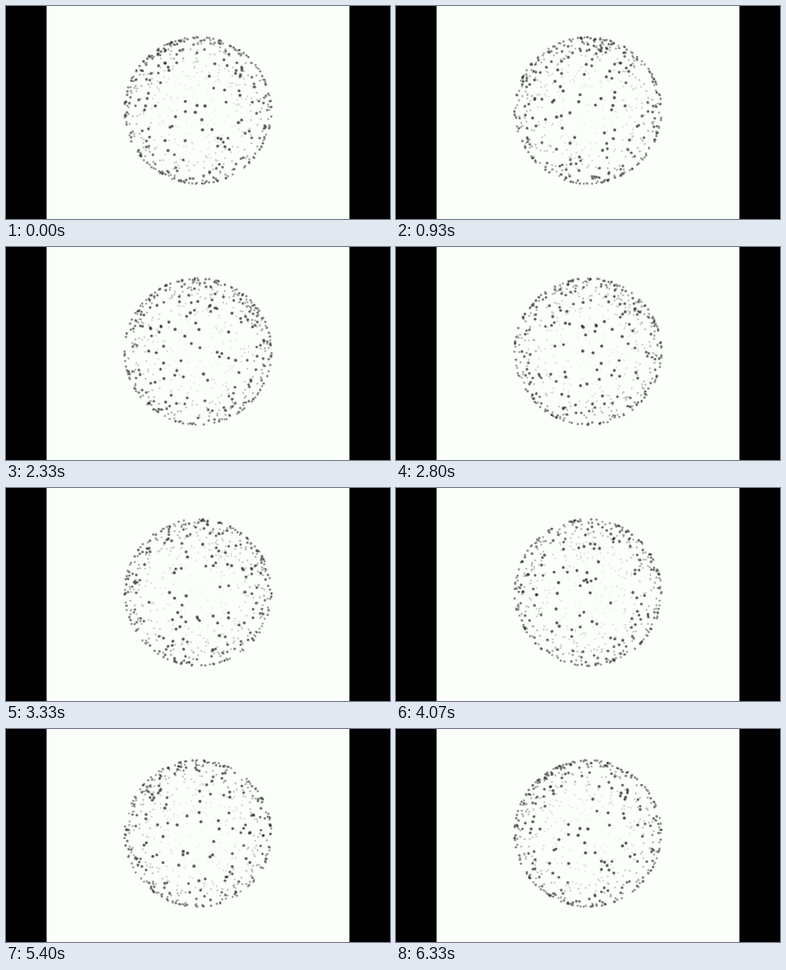
Recreate the animation shown at these times as an HTML page with a canvas. Size 480 by 267 pixels, loop 6.39 s.

```html
<!DOCTYPE html>
<html>
<head>
<meta charset="utf-8">
<style>
html, body { margin: 0; width: 100%; height: 100%; overflow: hidden; background: #000; }
canvas { display: block; width: 480px; height: 267px; }
</style>
</head>
<body>
<canvas id="stage" width="480" height="267"></canvas>
<script>
const ctx = document.getElementById('stage').getContext('2d');
const LOOP = 6390, HOLD = 195, STEP = 200 / 3, FRAMES = 94;
const CX = 240, CY = 131, OUTLINE = 92, COUNT = 640;
const EYE = 2.8; // viewer distance in sphere radii
const RADIUS = OUTLINE * Math.sqrt(EYE * EYE - 1) / EYE;

let seed = 4711;
function random() {
  seed = (seed * 1664525 + 1013904223) % 4294967296;
  return seed / 4294967296;
}

// Evenly random dots on a unit sphere: height y, ring radius r, longitude a
const dots = Array.from({ length: COUNT }, () => {
  const y = random() * 2 - 1;
  const a = random() * 2 * Math.PI;
  return { y, a, r: Math.sqrt(1 - y * y), size: 0.9 + random() * 0.2 };
});

function disc(x, y, r, alpha) {
  ctx.globalAlpha = alpha;
  ctx.beginPath();
  ctx.arc(x, y, r, 0, 2 * Math.PI);
  ctx.fill();
}

function draw(angle) {
  ctx.globalAlpha = 1;
  ctx.fillStyle = '#000';
  ctx.fillRect(0, 0, 480, 267);
  ctx.fillStyle = '#fafff9';
  ctx.fillRect(50.7, 0, 378.6, 267);
  ctx.fillStyle = '#242824';
  for (const d of dots) {
    const z = d.r * Math.cos(d.a + angle);
    const scale = EYE / (EYE - z);
    const x = CX + RADIUS * scale * d.r * Math.sin(d.a + angle);
    const y = CY + RADIUS * scale * d.y;
    const r = 1.15 * scale * d.size;
    const alpha = 0.05 + 0.65 * Math.pow((z + 1) / 2, 1.2);
    disc(x, y, r + 0.45, alpha * 0.45);
    disc(x, y, r - 0.15, alpha);
  }
}

const start = performance.now();
function tick() {
  const t = (performance.now() - start) % LOOP;
  const n = t < HOLD ? 0 : Math.min(FRAMES - 1, Math.floor((t - HOLD) / STEP) + 1);
  draw(n * 2 * Math.PI / FRAMES);
  requestAnimationFrame(tick);
}
tick();
</script>
</body>
</html>
```
